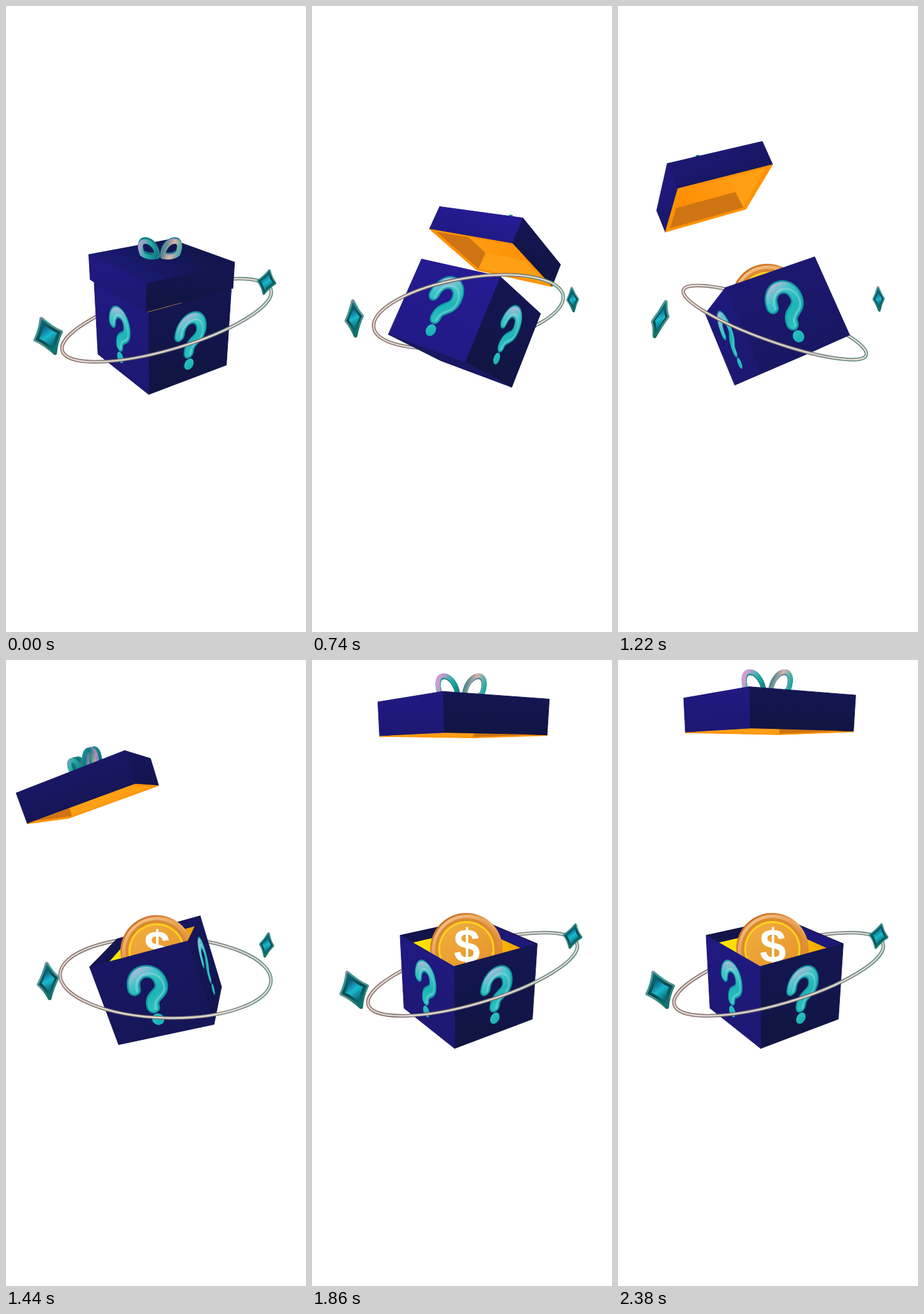
Recreate the animation shown at these times as an HTML page with a canvas. Size 480 by 1000 pixels, loop 2400 ms.

```html
<!DOCTYPE html>
<html lang="en">
<head>
<meta charset="utf-8">
<title>Mystery box</title>
<style>
html, body { margin: 0; width: 100%; height: 100%; overflow: hidden; background: #fff; }
canvas { display: block; width: 100vw; height: 100vh; }
</style>
</head>
<body>
<canvas id="stage" width="480" height="1000"></canvas>
<script>
const ctx = document.getElementById('stage').getContext('2d');
const { sin, cos, PI } = Math;
const LOOP = 2400, FOCAL = 800, DEG = PI / 180;
const YAW = 35 * DEG, PITCH = 24 * DEG;
const BOX = { w: 152, h: 130 }, LID = { w: 158, h: 41 };
const CENTER = [8, 7.5, 800], RING_AXIS = [-0.27, -0.925, -0.27];
const SIDES = [[-1, -1], [1, -1], [1, 1], [-1, 1]];
const NORMALS = [[0, 0, -1], [1, 0, 0], [0, 0, 1], [-1, 0, 0]];

// --- 3D: y points down, z away; a pose is { spin, at } ---
const rotY = ([x, y, z], a) => [x * cos(a) - z * sin(a), y, x * sin(a) + z * cos(a)];
const rotX = ([x, y, z], a) => [x, y * cos(a) - z * sin(a), y * sin(a) + z * cos(a)];
const turn = (p, spin) => rotY(rotX(rotY(p, YAW), PITCH), spin);
function project(p, { spin, at }) {
  const [x, y, z] = turn(p, spin), k = FOCAL / (z + at[2]);
  return [240 + (x + at[0]) * k, 500 + (y + at[1]) * k];
}
const corner = (size, i, y, s = 1) => {
  const [x, z] = SIDES[i % 4];
  return [x * s * size.w / 2, y, z * s * size.w / 2];
};
const square = (size, pose, y, s = 1) =>
  [0, 1, 2, 3].map(i => project(corner(size, i, y, s), pose));
const wall = (size, pose, k, y0, y1, s0 = 1, s1 = s0) =>
  [[k, y0, s0], [k + 1, y0, s0], [k + 1, y1, s1], [k, y1, s1]]
    .map(([i, y, s]) => project(corner(size, i, y, s), pose));
const facing = ([a, b, c]) =>
  (b[0] - a[0]) * (c[1] - a[1]) - (b[1] - a[1]) * (c[0] - a[0]) > 0;

const clamp = v => Math.max(0, Math.min(1, v));
const sineEase = u => (1 - cos(PI * clamp(u))) / 2;

// --- paint helpers ---
function trace(pts) {
  ctx.beginPath();
  pts.forEach(p => ctx.lineTo(p[0], p[1]));
  ctx.closePath();
}
function fillPoly(pts, color) {
  trace(pts);
  ctx.fillStyle = ctx.strokeStyle = color;
  ctx.lineWidth = 1;
  ctx.fill();
  ctx.stroke();
}
function ramp(x0, y0, x1, y1, ...colors) {
  const g = ctx.createLinearGradient(x0, y0, x1, y1);
  colors.forEach((c, i) => g.addColorStop(i / (colors.length - 1), c));
  return g;
}
function navy(light) {
  const l = clamp(light);
  return `rgb(${14 + 28 * l},${20 + 8 * l},${60 + 105 * l})`;
}
function lightOn(normal, spin) {
  const [x, y] = turn(normal, spin);
  return Math.max(0.13, 0.42 - 0.34 * x - 0.5 * y);
}

// --- box ---
const hook = new Path2D('M-22-15C-20-47 21-46 20-16C19 3-3-2-3 18');
const point = new Path2D();
point.arc(-2, 38, 9, 0, 7);

function drawMark(k, pose) {
  const n = NORMALS[k].map(v => v * BOX.w / 2), [ax, az] = SIDES[k], [bx, bz] = SIDES[(k + 1) % 4];
  const o = project(n, pose);
  const p = project([n[0] + (bx - ax) * 10, 0, n[2] + (bz - az) * 10], pose);
  const q = project([n[0], 20, n[2]], pose);
  ctx.save();
  ctx.transform((p[0] - o[0]) / 20, (p[1] - o[1]) / 20, (q[0] - o[0]) / 20, (q[1] - o[1]) / 20, o[0], o[1]);
  ctx.lineCap = 'round';
  const skin = ramp(-20, -46, 12, 45, '#c9b8dc', '#3cc4c6', '#1fb4b6', '#2cc4c0', '#18adb4');
  for (const [width, color] of [[20, '#1397a2'], [15, skin]]) {
    ctx.lineWidth = width;
    ctx.strokeStyle = ctx.fillStyle = color;
    ctx.stroke(hook);
    ctx.fill(point);
  }
  ctx.translate(3, 4);
  ctx.lineWidth = 3;
  ctx.strokeStyle = 'rgba(215,235,240,.3)';
  ctx.stroke(hook);
  ctx.restore();
}

function drawSides(size, pose, marked) {
  for (let k = 0; k < 4; k++) {
    const quad = wall(size, pose, k, -size.h / 2, size.h / 2);
    if (!facing(quad)) continue;
    const l = lightOn(NORMALS[k], pose.spin), [a, b, c, d] = quad;
    fillPoly(quad, ramp((a[0] + b[0]) / 2, (a[1] + b[1]) / 2, (c[0] + d[0]) / 2, (c[1] + d[1]) / 2,
      navy(l + 0.07), navy(l - 0.06)));
    if (marked) drawMark(k, pose);
  }
}

function drawCoin(x, y) {
  ctx.save();
  ctx.translate(x, y);
  const disc = (r, color) => {
    ctx.beginPath();
    ctx.arc(0, 0, r, 0, 7);
    ctx.fillStyle = color;
    ctx.fill();
  };
  disc(58, ramp(-40, -50, 40, 40, '#c9661c', '#efae62', '#d97a1e'));
  disc(55, ramp(-30, -56, 30, 40, '#f3c48a', '#e59a48', '#dd8426'));
  disc(50, '#dd8a30');
  disc(45, '#ffd21e');
  disc(42, ramp(-30, -40, 30, 40, '#f0ac3c', '#e5932a'));
  ctx.font = 'bold 76px "Liberation Sans", Arial, sans-serif';
  ctx.textAlign = 'center';
  ctx.textBaseline = 'middle';
  ctx.fillStyle = '#fff';
  ctx.fillText('$', 1, 0);
  ctx.restore();
}

function drawInside(pose, rim) {
  const top = -BOX.h / 2;
  ctx.save();
  trace(rim);
  ctx.clip();
  for (let k = 0; k < 4; k++) {
    const quad = wall(BOX, pose, k, top, top + 40, 0.96);
    if (!facing(quad)) fillPoly(quad, navy(lightOn(NORMALS[k].map(v => -v), pose.spin)));
  }
  const gold = square(BOX, pose, top + 13, 0.86);
  fillPoly(gold, ramp(gold[3][0], gold[3][1], gold[1][0], gold[1][1], '#ffe600', '#ffcf00', '#f0a000'));
  ctx.restore();
}

function drawBox(pose, lifted, coinX, coinY) {
  const rim = square(BOX, pose, -BOX.h / 2), base = square(BOX, pose, BOX.h / 2);
  if (facing([...rim].reverse())) {
    fillPoly(rim, '#15123f');
    if (lifted) drawInside(pose, rim);
  }
  drawCoin(coinX, coinY);
  drawSides(BOX, pose, true);
  if (facing(base)) fillPoly(base, navy(0.35));
}

// --- lid ---
function drawBow(pose) {
  const at = (u, y, v) => {
    const [x, , z] = rotY([u, 0, v], -YAW);
    return project([x, y - LID.h / 2, z], pose);
  };
  const [x, y] = at(0, -14, 0);
  ctx.lineCap = 'round';
  for (const [v, width, colors] of [
    [6, 8, ['#0b5f66', '#17989a', '#0a5a66']],
    [0, 8, ['#1bb5a8', '#0c6d74', '#b98ac8', '#149a98']],
    [-5, 7, ['#cf9ccf', '#25b0a8', '#0d7a80', '#e0b4a8', '#1aa9a4']]
  ]) {
    ctx.strokeStyle = ramp(x - 34, y - 12, x + 34, y + 12, ...colors);
    ctx.lineWidth = width;
    for (const s of [-1, 1]) {
      ctx.beginPath();
      ctx.moveTo(...at(s * 4, -4, v));
      ctx.bezierCurveTo(...at(s * 6, -32, v), ...at(s * 38, -36, v), ...at(s * 27, -8, v));
      ctx.quadraticCurveTo(...at(s * 18, -1, v), ...at(s * 4, -4, v));
      ctx.stroke();
    }
  }
}

function drawLid(pose) {
  const half = LID.h / 2, top = square(LID, pose, -half).reverse(), under = square(LID, pose, half);
  const seen = facing(top);
  if (!seen) drawBow(pose);
  drawSides(LID, pose, false);
  if (facing(under)) {
    fillPoly(under, '#ff9200');
    ctx.save();
    trace(square(LID, pose, half - 1, 0.9));
    ctx.clip();
    const roof = square(LID, pose, 10 - half, 0.84);
    fillPoly(roof, ramp(roof[0][0], roof[0][1], roof[2][0], roof[2][1], '#ff8a00', '#ffa51a'));
    for (let k = 0; k < 4; k++) {
      const quad = wall(LID, pose, k, 10 - half, half, 0.84, 0.9);
      if (!facing(quad)) fillPoly(quad, k % 2 ? '#cf7412' : '#ff9f14');
    }
    ctx.restore();
  }
  if (seen) {
    fillPoly(top, ramp(top[3][0], top[3][1], top[1][0], top[1][1], '#191a72', '#12164e'));
    drawBow(pose);
  }
}

// --- ring and stars ---
function drawRing(spin, front) {
  const [nx, ny, nz] = rotY(RING_AXIS, -spin), tilt = Math.atan2(nx, -ny);
  const x = 252 + 5 * cos(spin), y = 498 + 4 * cos(spin) - 9 * sin(spin);
  const a = 159 + 15 * cos(spin), b = -nz * a;
  ctx.beginPath();
  ctx.ellipse(x, y, a, Math.abs(b), tilt, 0, PI, front !== b > 0);
  for (const [width, color] of [
    [5.5, ramp(x - a, y, x + a, y, '#8a5a50', '#55555f', '#66666c', '#2f8a78')],
    [3.6, '#aaa6a4'],
    [1.5, '#f0e6da']
  ]) {
    ctx.lineWidth = width;
    ctx.strokeStyle = color;
    ctx.stroke();
  }
}

const starPath = new Path2D('M0-.92Q.34-.4 .9 0Q.34 .4 0 .92Q-.34 .4-.9 0Q-.34-.4 0-.92Z');
function drawStar(x, y, size, lean, slant, spin) {
  const w = size * (0.42 + 0.34 * cos(spin) ** 2);
  const shape = k => {
    const path = new Path2D();
    path.addPath(starPath, { a: w * k, b: slant * k, c: lean * k, d: size * k, e: x, f: y });
    return path;
  };
  const across = (k, ...colors) => ramp(x - w * k, y - size * k, x + w * k, y + size * k, ...colors);
  ctx.lineWidth = size / 5;
  ctx.strokeStyle = across(1, '#b58ab4', '#2f9a90', '#5f9a94', '#1b7f6c', '#12565a');
  ctx.stroke(shape(1));
  ctx.fillStyle = across(1, '#147f86', '#08454e', '#0f8f88');
  ctx.fill(shape(1));
  ctx.fillStyle = across(0.5, '#0a4a78', '#18b9cc', '#0a5a70');
  ctx.fill(shape(0.7));
}

function draw(t) {
  const spin = 2 * PI * sineEase((t - 60) / 1820);
  const rise = sineEase(clamp(t / 1980) ** 1.33);
  const axis = turn([0, -1, 0], spin), lift = 88 + 286 * rise;
  const box = { spin, at: CENTER };
  const lid = { spin, at: CENTER.map((v, i) => v + axis[i] * lift - (i ? 0 : 2 + 7 * rise)) };
  const coinY = 462 + 60 * (1 - clamp(t / 1900)) ** 2;
  const sway = 34 * sin(spin / 2);
  const fromAbove = facing(square(BOX, box, -BOX.h / 2).reverse());

  ctx.fillStyle = '#fff';
  ctx.fillRect(0, 0, 480, 1000);
  ctx.lineJoin = 'round';
  ctx.lineCap = 'butt';
  drawRing(spin, false);
  if (!fromAbove) drawLid(lid);
  drawBox(box, rise > 0.002, 247 + 8 * sin(spin), coinY);
  if (fromAbove) drawLid(lid);
  ctx.lineCap = 'butt';
  drawRing(spin, true);
  drawStar(67.5, 527 - sway, 30, 12 * cos(spin) + 7 * sin(spin), -5 - 2 * cos(spin), spin);
  drawStar(417, 441 + sway, 20, -5 * cos(spin), 2 * cos(spin), spin);
}

function tick() {
  draw(performance.now() % LOOP);
  requestAnimationFrame(tick);
}
tick();
</script>
</body>
</html>
```
